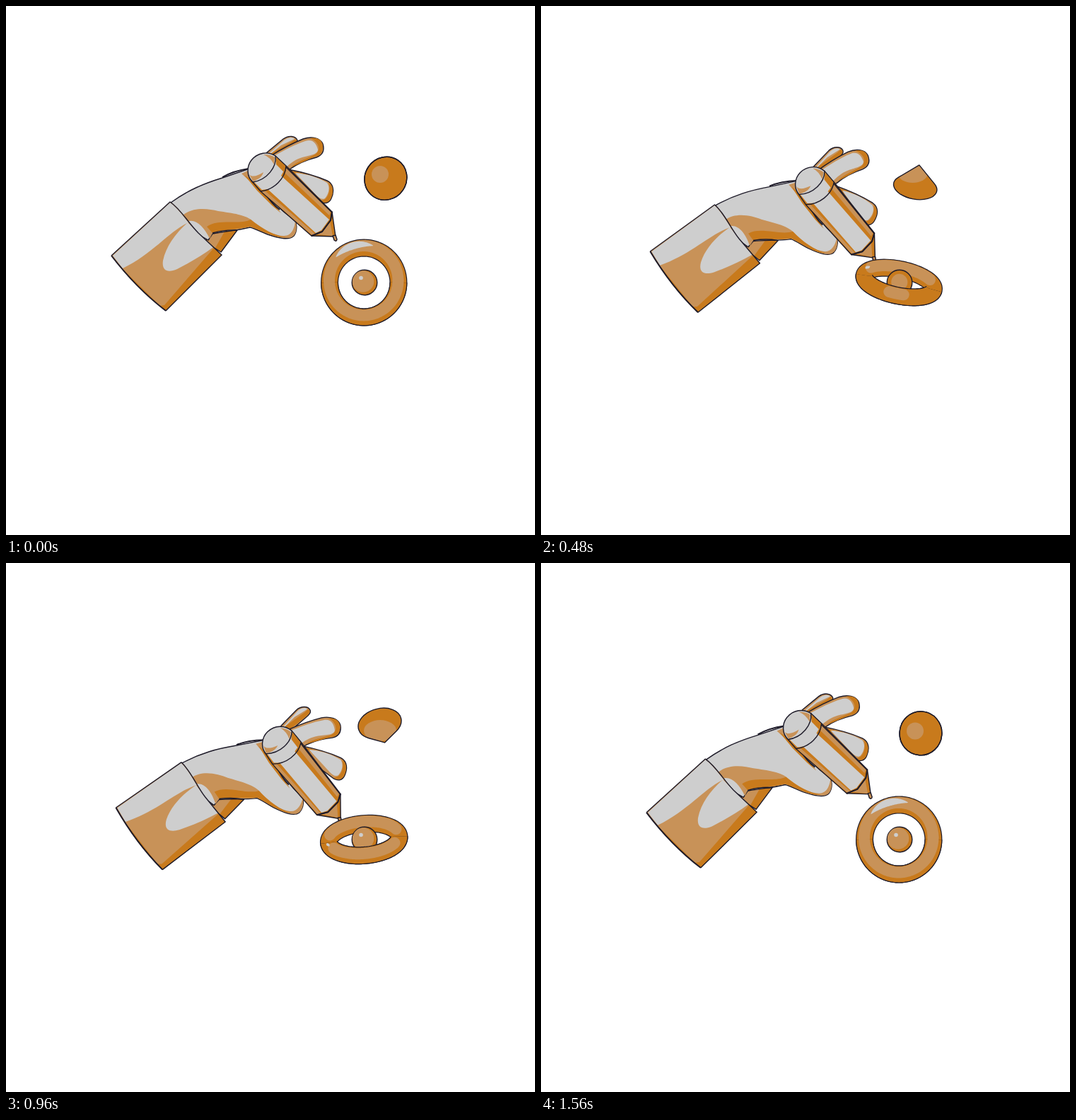
These frames come from a looping animation (748x748 px, 1.6 s). An HTML page:

```html
<!DOCTYPE html>
<html lang="en">
<head>
<meta charset="utf-8">
<title>Hand, pencil and solids</title>
<style>
  html, body { margin: 0; width: 100%; height: 100%; overflow: hidden; background: #fff; }
  svg { display: block; width: 100vw; height: 100vh; }
  path, ellipse, circle { stroke-linejoin: round; }
  .g { fill: #cecece; }
  .d { fill: #c87a1c; }
  .l { fill: #c89258; }
  .o { stroke: #1d1a28; stroke-width: 1.4; }
  .n { fill: none; }
  .b { stroke-width: 2; }
  .ink { fill: none; stroke: #1d1a28; stroke-width: 25; }
  .tube { fill: none; stroke: #c87a1c; stroke-width: 22.6; }
  .glow { fill: none; stroke: #c89258; stroke-width: 16; stroke-linecap: round; }
</style>
</head>
<body>
<svg viewBox="0 0 748 748">
  <defs>
    <clipPath id="coneClip"><path id="coneMask"/></clipPath>
    <clipPath id="ballClip"><circle cx="507" cy="391" r="17.6"/></clipPath>
  </defs>

  <g id="hand">
    <g id="finger1">
      <path class="l o" d="M362 216 L369 207 L392 188 C400 182 410 184 412 190 C413 194 409 197 404 200 L378 218 Z"/>
      <path class="d" d="M372 210 L404 192 C408 189 410 187 411 190 C412 194 408 196 404 199 L380 214 Z"/>
      <path class="g" d="M368 212 L393 190 C399 185 406 185 408 188 L389 197 L374 209 Z"/>
    </g>
    <g id="finger2">
      <path class="l o" d="M374 212 C390 202 405 194 420 188 C432 184 444 186 448 195 C451 205 447 211 439 214 C423 218 412 223 401 231 L390 234 Z"/>
      <path class="d" d="M430 187 C442 185 448 191 448 199 C448 208 444 212 437 213 L403 228 C412 219 428 215 437 210 C446 204 443 192 430 187 Z"/>
      <path class="g" d="M379 212 C395 203 408 196 423 191 C434 187 439 195 441 203 C441 210 430 211 419 214 C409 217 403 222 397 227 Z"/>
    </g>
    <g id="finger3">
      <path class="l o" d="M399 231 C420 235 440 241 454 247 C464 252 464 263 460 272 C457 279 451 280 445 277 L405 248 Z"/>
      <path class="d" d="M399 232 L425 238 L447 252 L430 249 Z M456 249 C464 255 463 265 459 273 C455 279 449 279 444 275 C454 276 460 263 456 249 Z"/>
      <path class="g" d="M409 236 C425 237 443 243 454 250 C459 257 456 266 451 272 C444 276 437 265 428 256 Z"/>
    </g>

    <path class="d o" d="M288 318 L327 317 L304 348 L282 334 Z"/>
    <path class="l" d="M290 320 L309 319 L296 342 L284 333 Z"/>
    <path class="n o b" d="M306 242 Q322 233 343 230"/>
    <path class="g o" d="M233 278 C258 260 280 251 306 243 L344 230 L372 262 C380 280 392 292 404 299 C413 304 412 318 407 325 C400 332 385 328 370 323 C358 318 350 314 345 313 C325 318 310 318 292 322 L286 331 L270 322 Z"/>
    <path class="l" d="M249 297 C262 284 285 286 300 290 C320 293 340 295 350 305 C365 317 380 325 393 325 C404 325 408 314 409 304 C413 314 410 328 399 328 C380 329 360 316 345 312 C325 317 310 316 292 321 L288 329 C280 312 268 300 256 305 Z"/>
    <path class="d" d="M284 312 C300 300 330 310 346 302 C362 315 380 325 396 327 C380 329 360 317 345 312 C325 317 310 316 292 321 Z"/>
    <path class="l" d="M333 237 L344 232 L352 252 L366 266 L358 260 Z"/>
    <path class="d" d="M337 239 L346 245 L364 262 L389 293 L376 282 L355 261 Z"/>
    <path class="n o" d="M292 321 Q310 316 326 317"/>
    <path class="n o b" d="M366 264 Q376 280 387 288"/>

    <path class="l" d="M149 353 L232 277 C247 287 257 306 272 321 L305 352 L226 431 C196 408 172 383 149 353 Z"/>
    <path class="d" d="M294 342 L305 352 L226 431 L217 424 L224 423 Z M149 353 L164 371 L221 427 Q182 398 149 353 Z"/>
    <path class="g" d="M151 353 L232 278 C244 287 250 297 258 306 C230 319 208 350 165 371 Z"/>
    <path class="g" d="M257 306 C240 321 226 340 222 360 C220 374 228 378 242 372 C260 363 278 352 293 341 L272 321 Z"/>
    <path class="n o" d="M149 353 L232 277 C247 287 257 306 272 321 L305 352 L226 431"/>
    <path class="n o b" d="M226 431 C196 408 172 383 149 353"/>

    <path class="d o" d="M461 291 L466 326 L432 325 Z"/>
    <path class="l" d="M458 305 L462 325 L440 323 Z"/>
    <path class="l o" d="M462 325 L466 324 L468 330 Q467 334 464 331 Z"/>
    <path class="d o" d="M347 247 L360 262 L432 325 L447 319 L459 303 L461 291 L396 226 L381 212 Z"/>
    <path class="l" d="M361 262 L366 261 L438 323 L433 324 Z M390 232 L396 228 L459 291 L457 296 Z"/>
    <path class="g" d="M350 248 L381 213 L395 229 L389 240 L457 302 L446 317 L438 321 L370 259 L362 260 Z"/>
    <path class="d" d="M381 213 L396 227 L395 237 L382 224 Z"/>
    <path class="g o" d="M349 249 C340 241 340 227 347 218 C356 207 370 205 381 212 C383 228 369 246 349 249 Z"/>
    <path class="l" d="M344 238 C348 243 356 240 364 235 C362 242 356 246 349 248 Z M364 210 Q375 210 380 214 L379 224 Q374 214 364 210 Z"/>
    <path class="n o" d="M360 262 C379 260 395 244 396 226 M396 228 L461 292"/>
    <path class="n o b" d="M432 325 L447 319 L459 303 L461 291"/>
  </g>

  <g id="ring">
    <path class="ink" id="backInk"/>
    <path class="tube" id="backTube"/>
    <path class="glow" id="backGlow" transform="translate(-.5 -3)"/>
  </g>
  <circle class="d o" cx="507" cy="391" r="17.8"/>
  <circle class="l" id="ballGlow" clip-path="url(#ballClip)"/>
  <circle class="g" id="ballSpot" cx="502" cy="384.5"/>
  <g id="rim">
    <path class="ink" id="rimInk"/>
    <path class="tube" id="rimTube"/>
    <path class="glow" id="rimGlow" transform="translate(-.5 -2.6)"/>
    <path class="g" id="shine" transform="translate(-1 -3)"/>
  </g>

  <path class="d" id="coneFill"/>
  <g clip-path="url(#coneClip)"><ellipse class="l" id="coneGlow"/></g>
  <path class="n o" id="coneEdge"/>
  <ellipse class="n o" id="coneBase"/>
</svg>
<script>
  const LOOP = 1600, STEP = 40, RAD = Math.PI / 180;
  const TIMES = [0, 320, 640, 960, 1120, 1400, 1560];
  const $ = id => document.getElementById(id);
  const set = (id, attrs) => {
    for (const k in attrs) $(id).setAttribute(k, attrs[k]);
  };

  // Smooth periodic curve through one value per key time; turn is the gain per loop.
  function track(values, turn = 0) {
    const n = TIMES.length;
    const at = i => {
      const lap = Math.floor(i / n), k = i - lap * n;
      return [TIMES[k] + lap * LOOP, values[k] + lap * turn];
    };
    const slope = i => {
      const [t0, v0] = at(i - 1), [t1, v1] = at(i), [t2, v2] = at(i + 1);
      const h0 = t1 - t0, h1 = t2 - t1;
      return ((v1 - v0) / h0 * h1 + (v2 - v1) / h1 * h0) / (h0 + h1);
    };
    return t => {
      let i = n - 1;
      while (TIMES[i] > t) i--;
      const [t0, v0] = at(i), [t1, v1] = at(i + 1);
      const h = t1 - t0, u = (t - t0) / h, w = 1 - u;
      return v0 * w * w * (1 + 2 * u) + v1 * u * u * (3 - 2 * u)
        + h * u * w * (slope(i) * w - slope(i + 1) * u);
    };
  }

  const swing = track([0, 4.1, 8.4, 7.7, 5.2, 1.1, .2]);
  const fingers = [
    ['finger1', 365, 222, track([0, -11, -14, -14, -10, -1.5, 0])],
    ['finger2', 380, 235, track([0, -10, -9, 0, 3, 3, 1])],
    ['finger3', 400, 240, track([0, 2, 1, -7, -6, -3, 0])]
  ];

  const ringMinor = track([49, 33.5, 7.5, 22.4, 37.5, 49.6, 49.1]);
  const ringLean = track([0, 18, 2.5, -5, -19, -4, 0]);
  const glowTop = track([90, 66, 55, 70, 90, 90, 90]);
  const glowLow = track([90, 0, 38, 60, 90, 90, 90]);
  const shineAt = track([-107, -122, -186, -194, -204, -108, -107]);
  const shineHalf = track([33, 13, 4, 6, 22, 33, 33]);
  const ballGlow = track([15.3, 9, 15, 15.3, 15.3, 15.3, 15.3]);
  const ballSpot = track([2.8, 0, 0, 2.8, 2.8, 2.8, 2.8]);

  const coneTurn = track([10, 93, 155, 225, 275, 323, 361], 360);
  const coneGlow = {
    cx: track([529, 526, 526, 529, 528, 528, 529]),
    cy: track([238, 241, 234, 237, 232, 233, 237.5]),
    rx: track([12, 12, 29, 23, 20, 11, 12]),
    ry: track([12, 10, 15, 15, 10, 11, 12])
  };

  const join = pts => 'M' + pts.map(p => p[0].toFixed(2) + ' ' + p[1].toFixed(2)).join('L');

  function arc(a, b, from, to, grow = () => 0) {
    const pts = [], n = 72;
    for (let i = 0; i <= n; i++) {
      const q = (from + (to - from) * i / n) * RAD, g = grow(i / n);
      pts.push([(a + g) * Math.cos(q), (b + g) * Math.sin(q)]);
    }
    return pts;
  }

  function drawHand(t) {
    set('hand', { transform: `rotate(${swing(t)} 204 397)` });
    for (const [id, x, y, turn] of fingers)
      set(id, { transform: `rotate(${turn(t)} ${x} ${y})` });
  }

  function drawRing(t) {
    const b = ringMinor(t), a = 48.7 + (1 - b / 49) * 2.3;
    const place = { transform: `translate(506.2 391) rotate(${ringLean(t)})` };
    set('ring', place);
    set('rim', place);

    const whole = join(arc(a, b, 0, 360)) + 'Z', front = join(arc(a, b, 0, 180));
    set('backInk', { d: whole });
    set('backTube', { d: whole });
    set('rimInk', { d: front });
    set('rimTube', { d: front });

    const top = Math.min(90, glowTop(t)), low = Math.max(0, Math.min(90, glowLow(t)));
    set('backGlow', { d: join(arc(a, b, -90 - top, -90 + top)) });
    set('rimGlow', {
      d: join(arc(a, b, 90 - low, 90 + low)),
      'stroke-width': 16,
      visibility: low > 3 ? 'visible' : 'hidden'
    });

    const mid = shineAt(t), half = Math.max(2, shineHalf(t));
    const thick = Math.min(5, 1.5 + half / 9);
    const bulge = side => u => 2 + side * thick * Math.sin(Math.PI * u) ** .8;
    const outer = arc(a, b, mid - half, mid + half, bulge(1));
    const inner = arc(a, b, mid - half, mid + half, bulge(-1)).reverse();
    set('shine', { d: join(outer.concat(inner)) + 'Z' });

    const r = ballGlow(t), off = (r - 9) / 6.3;
    set('ballGlow', { cx: 508 - 3 * off, cy: 391 - 1.5 * off, r });
    set('ballSpot', { r: Math.max(0, Math.min(2.8, ballSpot(t))) });
  }

  function drawCone(t) {
    const R = 31, H = 38, q = coneTurn(t) * RAD;
    const ux = -.26 * Math.cos(q), uy = -Math.sin(q), uz = -.966 * Math.cos(q);
    const flat = Math.hypot(ux, uy), reach = H * flat, m = Math.max(.1, R * Math.abs(uz));
    const transform = `translate(${532 - ux * H / 2} ${240.5 - uy * H / 2}) rotate(${Math.atan2(uy, ux) / RAD})`;

    let d = `M${m} 0A${m} ${R} 0 1 1 ${-m} 0A${m} ${R} 0 1 1 ${m} 0Z`;
    if (reach > m) {
      const c = m / reach, x = m * c, y = R * Math.sqrt(1 - c * c);
      d = `M${reach} 0L${x} ${y}A${m} ${R} 0 1 1 ${x} ${-y}Z`;
    }
    for (const id of ['coneFill', 'coneMask', 'coneEdge']) set(id, { d, transform });
    set('coneBase', { rx: m, ry: R, transform, visibility: uz < 0 ? 'visible' : 'hidden' });
    for (const k in coneGlow) set('coneGlow', { [k]: coneGlow[k](t) });
  }

  function draw(now) {
    const t = Math.floor(now % LOOP / STEP) * STEP;
    drawHand(t);
    drawRing(t);
    drawCone(t);
  }

  const start = performance.now();
  function tick() {
    draw(performance.now() - start);
    requestAnimationFrame(tick);
  }
  tick();
</script>
</body>
</html>
```
